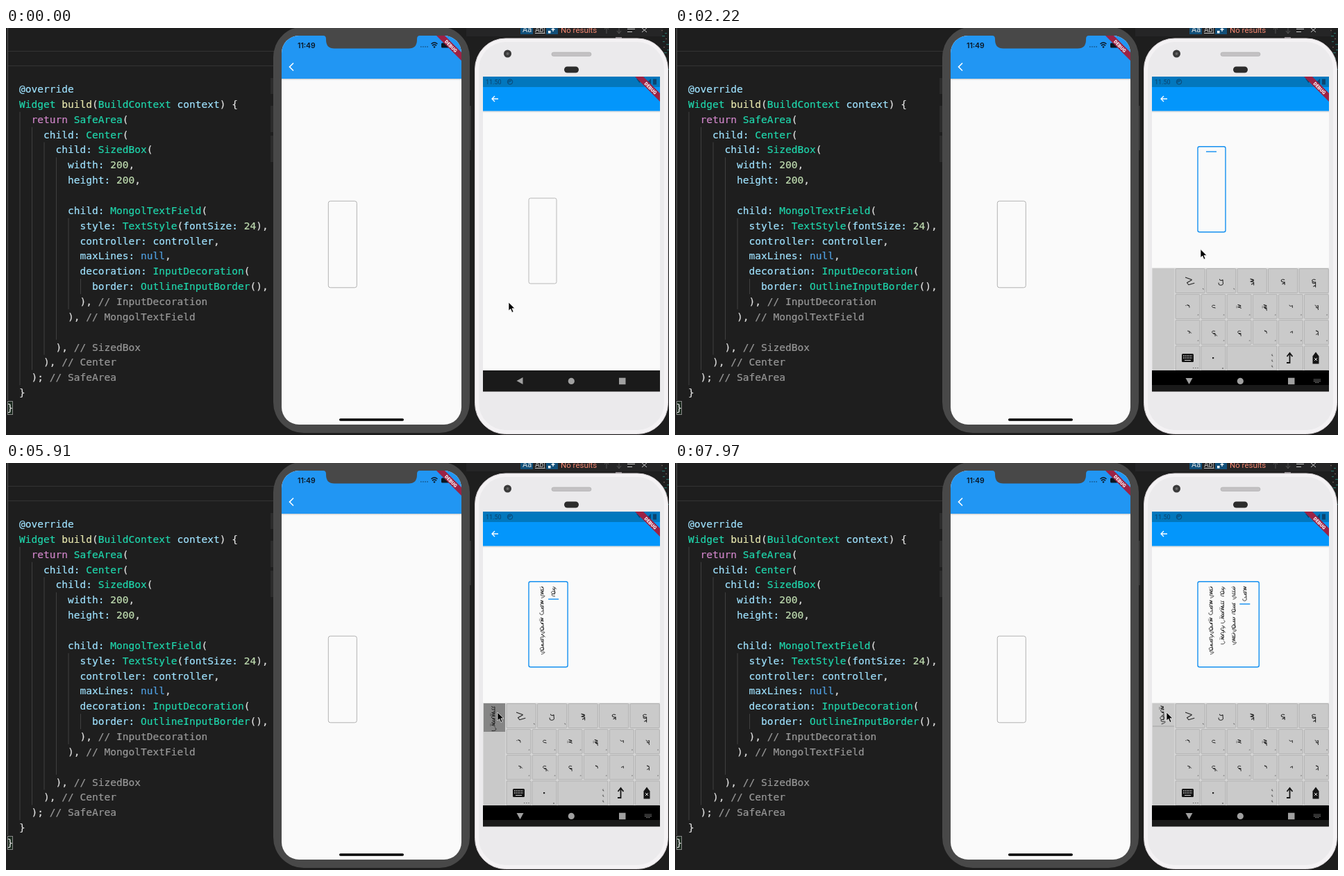
An HTML page that plays this animation: 955x586 px, repeating every 8 s.

```html
<!DOCTYPE html>
<html lang="en">
<head>
<meta charset="utf-8">
<title>Vertical text field demo</title>
<style>
html, body { margin: 0; width: 100%; height: 100%; overflow: hidden; background: #1e1e1e; }
svg { display: block; width: 955px; height: 586px; }
text { white-space: pre; }
.code { font: 14.54px "DejaVu Sans Mono", monospace; color: #dedede; }
.code, .code tspan { fill: currentColor; stroke: currentColor; stroke-width: .2; }
.ui { font-family: Roboto, "Open Sans", sans-serif; }
.ink { fill: none; stroke: #222; stroke-width: .85; stroke-linejoin: round; }
</style>
</head>
<body>
<svg id="stage" viewBox="0 0 955 586"></svg>
<script>
const LOOP = 8000, STEP = 147.6;

const rect = (x, y, w, h, fill, more = '') =>
  `<rect x="${x}" y="${y}" width="${w}" height="${h}" fill="${fill}" ${more}/>`;
const stroke = (d, color, width = 1, more = '') =>
  `<path d="${d}" fill="none" stroke="${color}" stroke-width="${width}" ${more}/>`;
const fill = (d, color, more = '') => `<path d="${d}" fill="${color}" ${more}/>`;
const label = (x, y, size, color, str, more = '') =>
  `<text class="ui" x="${x}" y="${y}" font-size="${size}" fill="${color}" ${more}>${str}</text>`;

// Vertical script: each letter is a relative stroke that ends lower on the spine.
const TOOTH = 'l-3-.8 3 1.6v2', COMB = 'l-4-1 4 2-4 1 4 1v1';
const LETTERS = {
  T: TOOTH,
  D: TOOTH + 'm-5-2.8h1m4 2.8',
  I: 'c-2 1.4-4 .8-4-.8m4 .8v3',
  O: 'c-5-2-6 3.4 0 2.8v.8',
  G: COMB,
  g: COMB + 'm-6-3h.9m0 1.8h-.9m6 1.2',
  B: 'c-6-2-6 5-1 3.6 3-1 1-3.6 1-3.6v4',
  R: 'l-3 1.6m3-1.6v2.6',
  L: 'l-2.6-.5m2.6 .5l2.6 2.6m-2.6-2.6v3',
  E: 'c2 4-6 5-5 .5',
  A: 'c-5-1-5 3 0 2.4 3-.6 3 1.6-3 3.2',
  S: 'm0 1.5c3 1 2 5-4 4',
  Z: 'l-8-3m8 3l-6 3.5 2 2.5 7-2'
};
const script = (x, y, word, scale = 1) =>
  `<path class="ink" transform="translate(${x} ${y}) scale(${scale})" d="M0 0${[...word].map(c => LETTERS[c]).join('')}"/>`;

const word = (letters, col, y, end, step) => ({ letters, col, y, end, step });
const WORDS = [
  word('DIGA', 0, 178, 197, 27),
  word('GOITRE', 0, 198, 222, 31),
  word('gOTRBA', 0, 223, 246, 34),
  word('LOITRTBA', 0, 247, 281, 36),
  word('LTBO', 1, 178, 196, 39),
  word('IIRgOTTgS', 1, 198, 233, 41),
  word('LOLOTgS', 1, 234, 266, 43),
  word('DTIIA', 2, 178, 200, 45),
  word('ITTBO', 2, 201, 221, 47),
  word('TTTRBA', 2, 222, 244, 49),
  word('DIGA', 2, 245, 266, 51),
  word('GOITRE', 3, 178, 203, 53),
  word('gOTRBA', 3, 204, 229, 99)
];

// [step, x, y] of the mouse pointer
const POINTER = [[0, 724, 395], [3, 716, 421], [4, 716, 421], [9, 762, 301], [14, 762, 301],
  [19, 737, 389], [20, 736, 395], [23, 736, 395], [26, 708, 359], [99, 708, 359]];

const CODE = `@override
Widget build(BuildContext context) {
  return SafeArea(
    child: Center(
      child: SizedBox(
        width: 200,
        height: 200,

        child: MongolTextField(
          style: TextStyle(fontSize: 24),
          controller: controller,
          maxLines: null,
          decoration: InputDecoration(
            border: OutlineInputBorder(),
          ), // InputDecoration
        ), // MongolTextField

      ), // SizedBox
    ), // Center
  ); // SafeArea
}`.split('\n');
const TOKEN = /\/\/.*|@?\w+:?/g;

function tokenColor(s) {
  if (s.startsWith('//')) return '#989898';
  if (s === 'null') return '#4f9fe0';
  if (s === 'return') return '#cf85c8';
  if (s === 'build') return '#e6e6ae';
  if (/^\d/.test(s)) return '#bfdcb0';
  return /^[A-Z]/.test(s) ? '#1fd6ac' : '#9fe2ff';
}

function editor() {
  const lineY = i => 93 + 21.86 * i;
  const lines = CODE.map((line, i) => {
    const body = line.trimStart(), x = 19 + 8.753 * (line.length - body.length);
    const spans = body.replace(TOKEN, s => `<tspan color="${tokenColor(s)}">${s}</tspan>`);
    return `<text class="code" x="${x}" y="${lineY(i)}">${spans}</text>`;
  });
  const guides = [[2, 19], [3, 18], [4, 17], [5, 16], [9, 14], [13, 13]].map(([a, b], i) =>
    stroke(`M${20 + 17.5 * i} ${lineY(a) - 16}V${lineY(b) + 6}`, '#404040'));
  return rect(0, 0, 955, 586, '#1e1e1e') +
    stroke('M2.5 0V536', '#555') + stroke('M3 33.5H386M3 54.5H386', '#333') +
    guides.join('') + lines.join('') +
    rect(2.5, 537.5, 7, 19, '#1c2b1f', 'stroke="#888"') +
    `<text class="code" x="1.5" y="552">}</text>`;
}

function findBar() {
  let map = '';
  for (let i = 0; i < 16; i++) map += rect(944 + i * 5 % 9, 3 + i * 4, 2 + i % 3, 1.2, i % 3 ? '#2b6f68' : '#6a5a55');
  return rect(663, 0, 283, 12, '#252526') +
    rect(741, -8, 18, 17, '#12507a') + rect(778, -8, 17, 17, '#12507a') +
    label(744, 6, 11, '#e4e4e4', 'Aa') + label(762, 6, 10, '#c5c5c5', 'Ab|', 'text-decoration="underline"') +
    rect(781, 4, 3.5, 3.5, '#fff') + stroke('M788 -1v6M785.5 2h5', '#fff', 1.3) +
    label(799, 7, 11.5, '#f48771', 'No results') +
    stroke('M865 8V-2M862 2l3-4 3 4M883 -2V8M880 4l3 4 3-4', '#555') +
    stroke('M895 1.5h11M895 5.5h7M916 0l7 6M923 0l-7 6', '#c5c5c5') + map;
}

const debugRibbon = (x, y, tx, ty) =>
  fill(`M${x - 36} ${y}h12L${x} ${y + 24}v12z`, '#9c2245') +
  label(0, 2.5, 6.8, '#fff', 'DEBUG', `font-weight="800" text-anchor="middle" transform="translate(${tx} ${ty}) rotate(45)"`);

function leftPhone() {
  const frame = '#484848';
  return [[72, 23], [112, 38], [155, 38]].map(([y, h]) => rect(381, y, 5, h, '#2b2b2b')).join('') +
    rect(666, 112, 4, 64, '#343434') +
    rect(385, -2, 283, 585, frame, 'rx="44"') +
    rect(397, 11, 259, 560, '#fafafa', 'rx="25"') +
    `<g clip-path="url(#leftScreen)">` +
    rect(397, 73, 259, 2.5, 'url(#shade)') + rect(397, 11, 259, 62, '#2196f3') +
    fill('M457 11q4 0 4 5v1q0 12.5 12 12.5h107q12 0 12-12.5v-1q0-5 4-5z', frame) +
    `<text x="420" y="28.8" font-family="Inter, sans-serif" font-size="10.4" font-weight="600" fill="#0b1622">11:49</text>` +
    stroke('M597 27h11', '#145589', 1.6, 'stroke-dasharray="1.6 1.5"') +
    stroke('M612.5 23q4.5-4 9 0M614 25.3q3-2.4 6 0', '#0b1622', 1.5) + fill('M615.3 27l1.7 2 1.7-2q-1.7-1.4-3.4 0z', '#0b1622') +
    rect(627, 21.5, 11, 7, '#0b1622', 'rx="1.5"') +
    debugRibbon(656, 11, 641, 26) + '</g>' +
    stroke('M414 50.5l-5.5 5.5 5.5 5.5', '#fff', 1.6) +
    rect(464.3, 249.2, 41, 124.6, 'none', 'rx="3" stroke="#b2b2b2"') +
    rect(480, 562.3, 93, 3.5, '#000', 'rx="1.7"');
}

function rightPhone() {
  const dim = '#0b4470';
  return rect(878, 13, 9, 4, '#8a8488') +
    rect(675.5, 15, 278, 569.5, '#f4f2f4', 'rx="44" stroke="#d3ced1"') +
    rect(681, 20, 267, 559, '#ebeaec', 'rx="39"') +
    '<circle cx="722.5" cy="37" r="5.5" fill="#3a3a3a"/><circle cx="722.5" cy="37" r="2" fill="#666"/>' +
    rect(786, 35, 57, 5.5, '#c3c1c3', 'rx="2.7" stroke="#aaa" stroke-width=".6"') +
    rect(804, 55.5, 21, 9, '#2c2c2c', 'rx="4.5"') +
    rect(687, 70, 255, 453, '#fafafa') + rect(687, 119.5, 255, 2.5, 'url(#shade)') +
    rect(687, 85, 255, 34.5, '#0396fb') + rect(687, 70, 255, 15, '#0277bd') +
    label(691, 81, 9, dim, '11.50') +
    `<circle cx="726" cy="77.5" r="3.7" fill="none" stroke="${dim}"/>` + stroke('M724 79v-3h3.5l-2 1.5', dim) +
    fill('M908 73h9l-4.5 6zM921 81h8v-8z', dim) + rect(932, 73.5, 5, 8, dim) +
    debugRibbon(942, 70, 928.5, 86.5) +
    stroke('M709 102h-9M704 98l-4 4 4 4', '#fff', 1.3);
}

function keyboard() {
  const key = (x, y, w) => rect(x, y, w, 35, '#cacaca', 'stroke="#aaa" stroke-width=".8" rx="1"');
  const hint = (x, y, c) => script(x, y, c, .45);
  const rows = [['Z', 'IE', 'GR', 'OR', 'OIR'], ['D', 'O', 'g', 'gT', 'I', 'IT'], ['L', 'OL', 'OT', 'T', 'R', 'TR']];
  const keys = rows.map((row, r) => row.map((letters, i) => {
    const pitch = r ? 37.1 : 44.5, x = 721 + i * pitch, y = 346.5 + r * 37.1, w = pitch - 2.2;
    return key(x, y, w) + script(x + w / 2 + 2.5, y + 16, letters, r ? 1.1 : 1.2) +
      (r || i < 2 ? hint(x + w - 2, y + 29, r ? 'R' : 'T') : '');
  }).join('')).join('');
  const bottom = [[721, 35], [758, 35], [795, 72], [869.5, 35], [906.5, 35]].map(([x, w]) => key(x, 457.8, w)).join('');
  return rect(687, 345.5, 255, 148, '#d6d6d6') + rect(688, 346, 31, 147, '#c9c9c9') +
    `<g stroke-width="1.2" class="keys">${keys}${bottom}</g>` +
    '<g id="pressedKey" opacity=".3">' + rect(721, 383.6, 35, 35, '#000') + '</g>' +
    rect(730, 469, 17, 12, '#151515', 'rx="1.5"') +
    stroke('M732 472h13M732 475h13', '#cacaca', 1.3, 'stroke-dasharray="1.3 1.2"') + stroke('M734 478.5h9', '#cacaca') +
    stroke('M746 489.5h8', '#555', 1, 'stroke-dasharray="1.2 2"') +
    rect(774, 474, 2.2, 2.2, '#222') + rect(788, 489, 2, 2, '#888') +
    [470, 478, 486].map(y => hint(861, y, 'OT')).join('') +
    stroke('M881 482h4.5V469M881.5 473l4-5 4 5', '#151515', 1.8) +
    fill('M918.5 483.5v-11l4.5-6 4.5 6v11z', '#151515') + stroke('M921 475l4 4M925 475l-4 4', '#ddd') +
    '<g id="candidates"></g>';
}

const stage = document.getElementById('stage');
stage.innerHTML = `<defs>
  <linearGradient id="shade" x2="0" y2="1"><stop stop-color="#888" stop-opacity=".4"/><stop offset="1" stop-color="#888" stop-opacity="0"/></linearGradient>
  <clipPath id="leftScreen">${rect(397, 11, 259, 560, '#000', 'rx="25"')}</clipPath>
  <clipPath id="app">${rect(687, 119, 255, 374.5, '#000')}</clipPath></defs>` +
  editor() + findBar() + leftPhone() + rightPhone() +
  '<g id="field"></g><g clip-path="url(#app)"><g id="keyboard">' + keyboard() + '</g></g><g id="nav"></g>' +
  fill('M0 0v12l2.8-2.5 2.1 5 2.1-.9-2.1-4.8h4z', '#000', 'id="pointer" stroke="#fff" stroke-width=".7"');
const part = Object.fromEntries(['field', 'keyboard', 'candidates', 'pressedKey', 'nav', 'pointer']
  .map(id => [id, document.getElementById(id)]));
const show = (node, on) => node.setAttribute('display', on ? 'inline' : 'none');

function fieldMarkup(n, typed) {
  const focused = n >= 12, last = typed[typed.length - 1];
  const col = last ? last.col : 0, letter = !last && n >= 23;
  const border = !focused ? '#b8b8b8' : n === 12 ? '#5f97c4' : '#1590f0';
  const cursorY = last ? last.end : letter ? 183 : 178;
  const cursor = focused && !(n >= 16 && n <= 18);
  return rect(753, focused ? 170.7 : 245, 40 + 16.1 * col, 123, 'none',
      `rx="2.5" stroke="${border}" stroke-width="${n > 12 ? 1.4 : 1}"`) +
    typed.map(w => script(774 + 16.3 * w.col, w.y + 1, w.letters)).join('') +
    (letter ? script(774, 180, 'D') : '') +
    (cursor ? rect(765 + 16.1 * col, cursorY - .7, 15, 1.5, '#2196f3') : '');
}

function candidatesMarkup(n, count) {
  if (n < 23) return '';
  const line = y => stroke(`M688 ${y}h31`, '#9a9a9a', .8);
  if (!count && n < 26) return script(704, 353, 'DIGA', 1.1) + line(376) + script(704, 382, 'DTTTTTRE', 1.1) + line(408);
  const next = WORDS[count], height = count === 2 ? 41 : Math.min(41, next.end - next.y + 8);
  const pressed = n === next.step - 1;
  return (pressed ? rect(688, 346, 31, height, '#858585') : line(346 + height)) +
    script(704, 351, next.letters, 1.1);
}

function navMarkup(n) {
  const gray = '#a0a0a0', open = n > 12;
  const angle = open ? -90 : n === 12 ? -10 : 0;
  return rect(687, 493, 255, 30.5, '#1a1a1a') +
    (open ? rect(687, 493, 255, 21, '#000') : n === 12 ? rect(736, 494, 194, 20, '#000') : '') +
    fill('M-5 0l9-5v10z', gray, `transform="translate(740.5 508) rotate(${angle})"`) +
    `<circle cx="814.3" cy="508.4" r="4.6" fill="${gray}"/>` + rect(883, 503.7, 9.5, 9.5, gray) +
    (n >= 12 ? stroke('M920 506h10M920 508.3h10M922 510.5h6', gray, 1.2, 'stroke-dasharray="1.3 .8"') : '');
}

function pointerAt(n) {
  const i = POINTER.findIndex(p => p[0] > n);
  const [a, ax, ay] = POINTER[i - 1], [b, bx, by] = POINTER[i];
  const k = (n - a) / (b - a);
  return `translate(${ax + (bx - ax) * k} ${ay + (by - ay) * k})`;
}

let shown = -1;
function draw(time) {
  const n = Math.floor((time % LOOP + 8) / STEP);
  if (n === shown) return;
  shown = n;
  const typed = WORDS.filter(w => n >= w.step);
  part.field.innerHTML = fieldMarkup(n, typed);
  part.candidates.innerHTML = candidatesMarkup(n, typed.length);
  part.nav.innerHTML = navMarkup(n);
  part.keyboard.setAttribute('transform', `translate(0 ${Math.max(0, 14 - n) * 75})`);
  part.pointer.setAttribute('transform', pointerAt(n));
  show(part.keyboard, n > 12);
  show(part.pressedKey, n === 22);
}

const start = performance.now();
function tick() {
  draw(performance.now() - start);
  requestAnimationFrame(tick);
}
tick();
</script>
</body>
</html>
```
